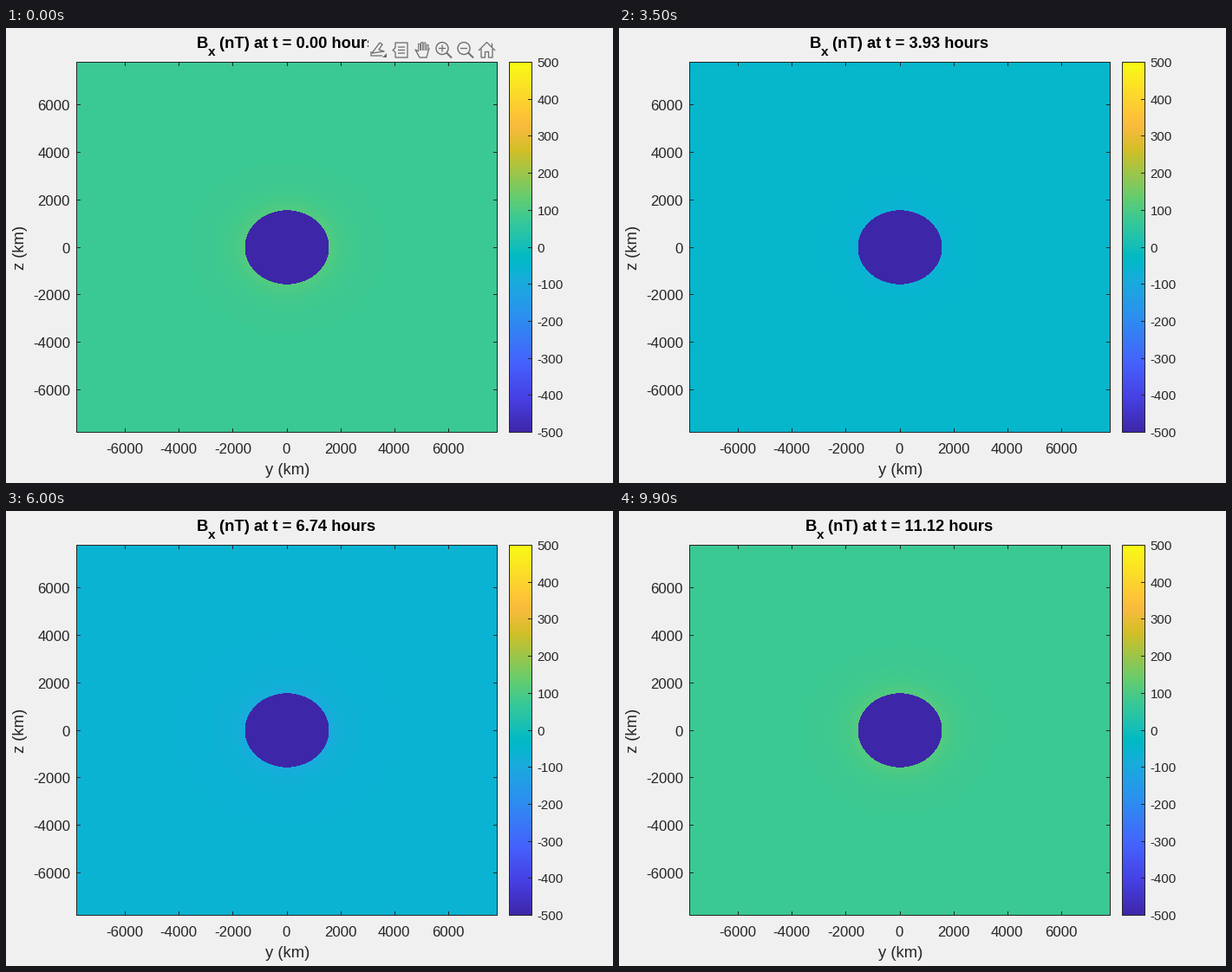
Write a matplotlib script that moves like this. It is 700 by 525 pixels and loops after 10 s.

```python
import numpy as np
import matplotlib.pyplot as plt
from matplotlib.animation import FuncAnimation
from matplotlib.colors import LinearSegmentedColormap
from matplotlib.patches import Circle, Polygon, Rectangle

W, H, DPI = 700, 525, 100
PX = 72 / DPI
FRAMES, INTERVAL = 100, 100
PERIOD = 11.23          # hours
B0, LIMIT = 75, 500     # nT
R, SPAN = 1560, 7800    # km
LEFT, TOP, RIGHT, BOTTOM = 81, 39, 566, 466
CX, CY = (LEFT + RIGHT + 1) / 2, (TOP + BOTTOM + 1) / 2
SX, SY = (RIGHT - LEFT) / 2 / SPAN, (BOTTOM - TOP) / 2 / SPAN
BAR_LEFT, BAR_RIGHT = 580, 606
BG, INK, ICON = "#f0f0f0", "#262626", "#6e6e6e"
TICK, LABEL, SUB, BAR = 16.7, 18.4, 15.4, 15

STOPS = [0, 6, 12, 20, 26, 28, 30, 32, 36, 40, 48, 52, 54, 63]
COLORS = ("#3e26a8 #4741e5 #4563fd #2b91ef #18addb #08b5d0 #02bac3 "
          "#18bfb6 #37c897 #64cd6f #d1bf27 #f8ba3d #fec338 #f9fb15").split()
cmap = LinearSegmentedColormap.from_list(
    "field", [(s / 63, c) for s, c in zip(STOPS, COLORS)], 256)

plt.rcParams["font.family"] = "Liberation Sans"
plt.rcParams["text.kerning_factor"] = 6
fig = plt.figure(figsize=(W / DPI, H / DPI), dpi=DPI, facecolor=BG)
ax = fig.add_axes([0, 0, 1, 1])
ax.axis("off")


def text(x, y, s, size, ha="left", color=INK, **kw):
    return ax.text(x, y, s, fontsize=size * PX, ha=ha, va="baseline",
                   color=color, **kw)


def line(xs, ys, color=INK, lw=1, z=4):
    return ax.plot(xs, ys, color=color, lw=lw * PX, zorder=z, snap=False,
                   solid_capstyle="butt")[0]


def frame(x0, x1):
    ax.add_patch(Rectangle((x0 + .5, TOP + .5), x1 - x0, BOTTOM - TOP,
                           fill=False, ec=INK, lw=PX, snap=False, zorder=4))


def image(data, x0, x1):
    return ax.imshow(data, cmap=cmap, vmin=-LIMIT, vmax=LIMIT, aspect="auto",
                     extent=(x0, x1 + 1, BOTTOM + 1, TOP),
                     interpolation="nearest", zorder=1)


# Uniform oscillating field plus the induced dipole, one cell per pixel
y_km = (np.arange(LEFT, RIGHT + 1) + .5 - CX) / SX
z_km = (np.arange(TOP, BOTTOM + 1) + .5 - CY) / SY
r = np.hypot(*np.meshgrid(y_km, z_km))
gain = 1 + .5 * (R / np.maximum(r, R)) ** 3


def field(n):
    b = B0 * np.cos(2 * np.pi * n / FRAMES)
    return np.where(r < R, -LIMIT, b * gain)


plot = image(field(0), LEFT, RIGHT)
image(np.linspace(LIMIT, -LIMIT, 256)[:, None], BAR_LEFT, BAR_RIGHT)
frame(LEFT, RIGHT)
frame(BAR_LEFT, BAR_RIGHT)

for v in range(-6000, 6001, 2000):
    x, y = CX + v * SX, CY - v * SY
    px, py = int(x) + .5, int(y) + .5
    for edge, step in ((BOTTOM, -4), (TOP + 1, 4)):
        line([px, px], [edge, edge + step])
    for edge, step in ((LEFT + 1, 4), (RIGHT, -4)):
        line([edge, edge + step], [py, py])
    text(x - .5, 491, str(v), TICK, "center")
    text(74, y + 6.5, str(v), TICK, "right")

for v in range(-LIMIT, LIMIT + 1, 100):
    y = CY - v / LIMIT * (BOTTOM - TOP) / 2
    line([BAR_RIGHT - 4, BAR_RIGHT], [int(y) + .5] * 2)
    text(612.5, y + 5.6, str(v), BAR)

text(CX + .5, 515, "y (km)", LABEL, "center")
text(21, CY, "z (km)", LABEL, "center", rotation=90, rotation_mode="anchor")

bold = dict(color="black", weight="bold")
title = [text(0, 23, "B", LABEL, **bold),
         text(0, 31.5, "x", SUB, **bold),
         text(0, 23, "", LABEL, **bold)]


def set_title(hours):
    value = f"{hours:.2f}"
    title[2].set_text(f"(nT) at t = {value} hours")
    left = 219.5 - .278 * LABEL * (len(value) - 4)
    for part, dx in zip(title, (0, 13.3, 27)):
        part.set_x(left + dx)


# Toolbar, shown only at the start
tools = [ax.add_patch(Rectangle((418, 13), 148, 24, fc=BG, zorder=5))]


def stroke(*pts, lw=1.3):
    tools.append(line(*zip(*pts), color=ICON, lw=lw, z=6))


def patch(shape):
    tools.append(ax.add_patch(shape))


# export
stroke((421, 27), (421, 32), (434, 32))
stroke((422, 29), (431, 17), (434, 19), (430, 25), (436, 27), (422, 29))
patch(Polygon([(439, 29), (439, 34), (434, 34)], fc=ICON, zorder=6))
# data tip
stroke((449, 23), (449, 17), (463, 17), (463, 34), (449, 34), (449, 28),
       (446, 25.5), (449, 23))
for y in (22, 25.5, 29):
    stroke((452, y), (460, y))
# hand
stroke((476, 27), (472, 25), (477, 34), (485, 34), (488, 23))
for i in range(4):
    x, tip = 475.5 + 3.2 * i, 16.5 + (i - 1.3) ** 2
    stroke((x, 26), (x, tip), (x + 2, tip), (x + 2, 26), lw=1)
# zoom in and out
for x in (503, 528):
    patch(Circle((x, 23.5), 7, fill=False, ec=ICON, lw=1.4 * PX, zorder=6))
    stroke((x + 5, 28.5), (x + 11, 34.5), lw=2)
    stroke((x - 4, 23.5), (x + 4, 23.5))
stroke((503, 19.5), (503, 27.5))
# home
stroke((545, 26), (554.5, 16.5), (564, 26))
stroke((548, 24), (548, 34), (552.5, 34), (552.5, 27.5), (556.5, 27.5),
       (556.5, 34), (561, 34), (561, 24))
stroke((560.5, 22), (560.5, 17.5))

ax.set_xlim(0, W)
ax.set_ylim(H, 0)


def update(n):
    plot.set_data(field(n))
    set_title(n / FRAMES * PERIOD)
    for part in tools:
        part.set_visible(n == 0)
    return [plot, *title, *tools]


anim = FuncAnimation(fig, update, frames=FRAMES, interval=INTERVAL,
                     repeat=True, repeat_delay=0, blit=False)
plt.show()
```
